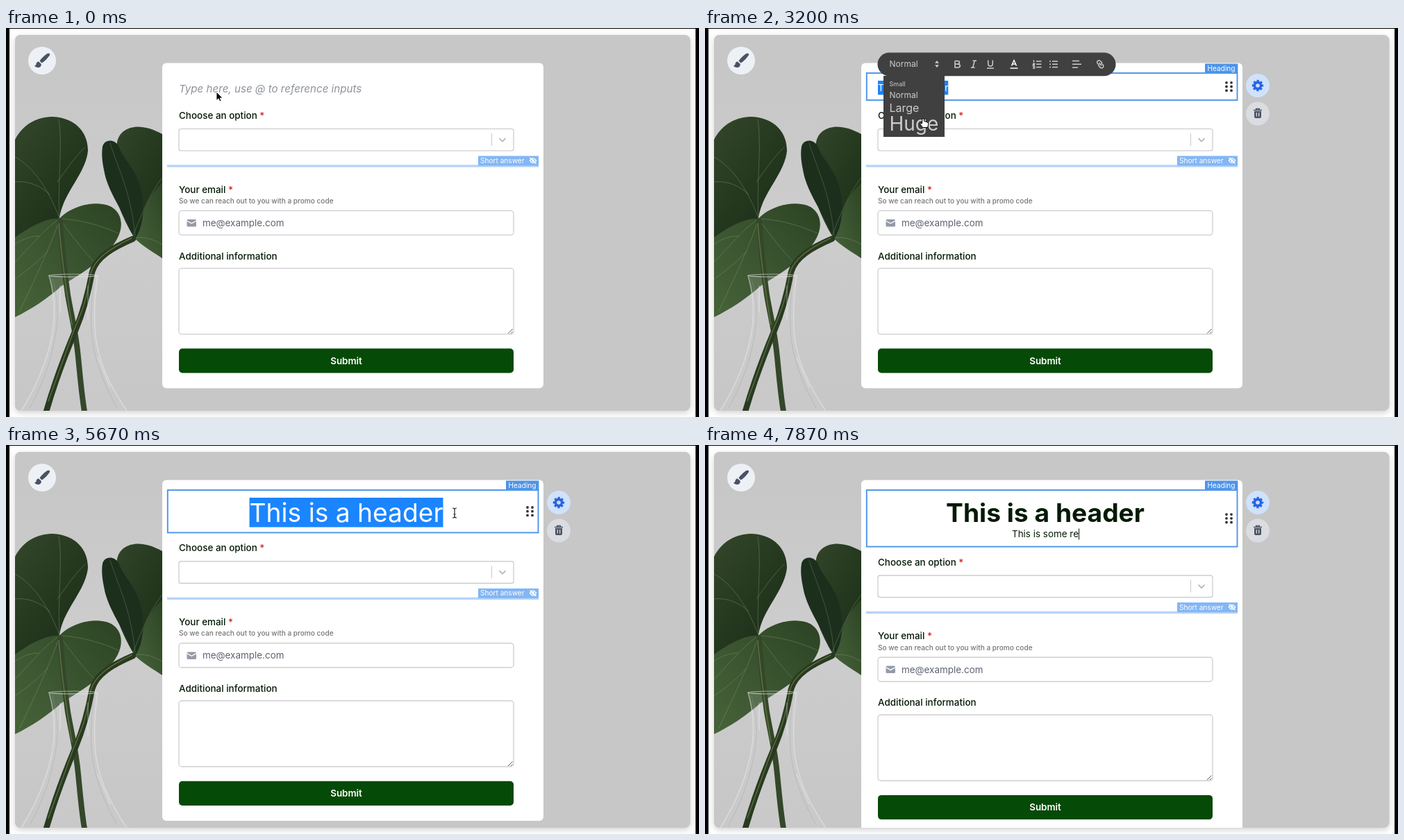
Recreate the animation shown at these times as an HTML page. Size 998 px wide and 561 px high, loop 8000 ms.

```html
<!DOCTYPE html>
<html lang="en">
<head>
<meta charset="utf-8">
<title>Form builder</title>
<style>
  html, body { margin: 0; width: 100%; height: 100%; overflow: hidden; background: #fff; }
  svg { display: block; width: 100%; height: 100%; }
  text { font-family: Inter, "Open Sans", sans-serif; font-size: 13.45px; font-optical-sizing: none; white-space: pre; }
  .label { font-weight: 500; fill: #041a04; }
  .star { fill: #d32020; }
  .tag { font-size: 10.15px; fill: #fff; }
  .field { fill: #fff; stroke: #c5c5c8; stroke-width: 1.1; }
  .icon { fill: none; stroke: currentColor; stroke-width: 1.5; color: #ccc; }
  .menu { fill: #404040; }
  .menu-text { fill: #ccc; }
</style>
</head>
<body>
<svg viewBox="0 0 998 561" xmlns="http://www.w3.org/2000/svg">
  <defs>
    <clipPath id="panelClip"><rect x="13" y="10" width="972.5" height="542" rx="8"/></clipPath>
    <linearGradient id="wall" x2="0" y2="1">
      <stop offset="0" stop-color="#c7c7c7"/><stop offset=".1" stop-color="#c7c7c7"/>
      <stop offset=".5" stop-color="#cdcdcd"/><stop offset=".95" stop-color="#c7c7c7"/>
    </linearGradient>
    <linearGradient id="leafDark" x2=".8" y2="1">
      <stop offset="0" stop-color="#34472b"/><stop offset=".5" stop-color="#263a20"/><stop offset="1" stop-color="#1b2c18"/>
    </linearGradient>
    <linearGradient id="leafLight" x1="1" x2="0" y2="1">
      <stop offset="0" stop-color="#2c4323"/><stop offset=".5" stop-color="#3a5430"/><stop offset="1" stop-color="#466339"/>
    </linearGradient>
  </defs>

  <rect width="998" height="561" fill="#fff"/>
  <path d="M0 0H998V1H0ZM0 0H5V561H0ZM993 0H998V561H993Z"/>
  <rect x="13" y="10" width="972.5" height="542" rx="8" fill="#c7c7c7" style="filter:drop-shadow(0 3px 4px rgba(0,0,0,.18))"/>

  <g clip-path="url(#panelClip)">
    <rect x="13" y="10" width="214" height="542" fill="url(#wall)"/>

    <g id="plant" fill="none" stroke-linecap="round">
      <path d="M160 165C164 142 192 134 225 153V332C205 318 193 310 185 303C166 272 155 240 147 205Z" fill="url(#leafDark)"/>
      <path d="M185 303C196 280 196 250 226 222V332C212 324 195 313 185 303Z" fill="url(#leafLight)"/>
      <path d="M139 171C142 160 156 160 162 170C170 192 190 205 196 240C200 270 195 290 186 304C172 270 152 245 143 214C139 196 137 184 139 171Z" fill="#1c2f1d"/>
      <path d="M150 166C160 200 180 235 186 300" stroke="#55704b" opacity=".6"/>
      <path d="M13 161C25 138 45 128 68 128C100 130 118 150 118 177C115 210 82 238 77 274C68 284 40 282 13 304Z" fill="url(#leafDark)"/>
      <path d="M13 302C35 286 60 273 77 275C92 258 128 246 152 258C174 272 168 302 146 322C130 342 105 356 80 372C60 390 36 406 13 417Z" fill="url(#leafLight)"/>
      <g stroke="#86a06c" opacity=".4">
        <path d="M77 274C62 235 40 200 13 186M77 274C74 220 82 170 76 132M77 275C55 290 35 315 13 338M77 276C66 310 45 355 20 408M78 275C105 276 135 284 162 296M78 276C95 300 110 320 126 336M182 302C198 260 210 235 225 216M184 303C200 300 212 305 225 312M74 222C90 200 100 185 114 172M63 240C48 226 30 220 13 222M48 300C36 300 24 304 13 312M60 322C45 338 30 350 13 362"/>
      </g>
      <path d="M62 357C70 385 72 415 66 445C58 485 42 520 22 552H174C152 520 134 485 129 445C126 415 128 385 132 357Z" fill="#d4d4d4" opacity=".18"/>
      <path d="M78 278C80 310 84 350 89 385C95 420 101 440 104 475C107 505 109 530 113 553" stroke="#35472a" stroke-width="8"/>
      <path d="M183 304C155 316 130 330 124 352C118 385 111 410 100 436C84 474 69 515 58 553" stroke="#293a20" stroke-width="8.500"/>
      <path d="M76 282C80 330 86 375 95 428M181 303C150 318 128 332 122 354C116 395 108 412 97 438L61 538" stroke="#74894f" stroke-width="1.600" opacity=".6"/>
      <path d="M62 357C70 385 72 415 66 445C58 485 42 520 22 552M132 357C128 385 126 415 129 445C134 485 152 520 174 552" stroke="#ececec" stroke-width="1.600" opacity=".5"/>
      <path d="M67 362C75 390 76 415 71 445C64 485 50 520 34 548M127 362C123 390 121 420 124 448C129 486 144 520 160 548" stroke="#999" opacity=".35"/>
      <ellipse cx="97" cy="357" rx="35" ry="2" stroke="#e6e6e6" stroke-width="1.200" opacity=".6"/>
      <path d="M118 372V420M78 372V410M132 475L150 518" stroke="#fff" stroke-width="1.500" opacity=".3"/>
    </g>

    <circle cx="52" cy="47" r="20" fill="#edf1f6"/>
    <path d="M63 37.500C62 36 60 36.500 58.500 37.500C54 41 50 44.500 48.500 47.500L51.500 50.500C55 49 59.500 44 62 40.500C63 39 63.500 38.300 63 37.500ZM47 48.500C44.500 48.500 43.700 50.500 43.500 52C43.300 53.600 42.300 54.200 41 54.200C42 56 44 57 46.200 57C49 57 51 55 50.800 52Z" fill="#4a5263"/>

    <rect id="card" x="225" y="50.500" width="549" rx="6" fill="#fff"/>

    <g id="form">
      <text class="label" x="249" y="131">Choose an option <tspan class="star">*</tspan></text>
      <rect class="field" x="249" y="145.500" width="482" height="31.500" rx="3"/>
      <path d="M699.500 152V170" stroke="#c8c8c8"/>
      <path d="M710.500 159L715 163.500L719.500 159" fill="none" stroke="#b4b4b4" stroke-width="1.700"/>

      <rect x="232" y="197.300" width="535" height="3.400" fill="#b6d4f8"/>
      <rect x="680" y="184.500" width="87" height="14" fill="#83b6f4"/>
      <text class="tag" x="683" y="195">Short answer</text>
      <g fill="none" stroke="#fff" stroke-width="1.400">
        <path d="M754.500 191.300Q759 184.500 763.500 191.300Q759 198 754.500 191.300ZM754.500 187L763.500 195.500"/>
        <circle cx="759" cy="191.300" r="1.200"/>
      </g>

      <text class="label" x="249" y="237.500">Your email <tspan class="star">*</tspan></text>
      <text x="249" y="253" fill="#747474" style="font-size:10.08px;font-weight:500">So we can reach out to you with a promo code</text>
      <rect class="field" x="249" y="263.500" width="482" height="35" rx="4"/>
      <rect x="260.500" y="276" width="13.500" height="10.500" rx="1.600" fill="#959ba7"/>
      <path d="M260.500 278.200L267.200 281.800L274 278.200" fill="none" stroke="#fff" stroke-width="1.300"/>
      <text x="283" y="286" fill="#5c6371">me@example.com</text>

      <text class="label" x="249" y="333.500">Additional information</text>
      <rect class="field" x="249" y="346.500" width="482" height="95" rx="4"/>
      <path d="M723 440.500L729.500 434M727 440.500L729.500 438" stroke="#555"/>
      <rect x="249" y="462.300" width="482" height="35.200" rx="5" fill="#064a07"/>
      <text x="490" y="484.700" text-anchor="middle" fill="#fff" font-weight="600">Submit</text>
    </g>

    <g id="chrome">
      <rect id="frame" x="232.800" y="65" width="533.700" fill="none" stroke="#4d94e8" stroke-width="1.900"/>
      <rect x="720" y="51.500" width="47.400" height="13.500" fill="#4d94e8"/>
      <text class="tag" x="743.500" y="61.700" text-anchor="middle">Heading</text>
      <g id="dots" fill="#333"></g>
      <circle cx="796" cy="83" r="17" fill="#d0e1fa"/>
      <g stroke="#2463e4" fill="none">
        <circle cx="796" cy="83" r="4.600" stroke-width="3.600"/>
        <circle cx="796" cy="83" r="7.100" stroke-width="2.200" stroke-dasharray="3.200 2.376" stroke-dashoffset="1.600"/>
      </g>
      <circle cx="796" cy="123.500" r="17" fill="#dbdce1"/>
      <path d="M790 118.500H802M793.800 118V116.500H798.200V118" fill="none" stroke="#4b5362" stroke-width="1.700"/>
      <path d="M791 120H801V128Q801 130 799 130H793Q791 130 791 128Z" fill="#4b5362"/>
      <path d="M794.300 122V127.500M797.700 122V127.500" stroke="#dbdce1" stroke-width="1.300"/>
    </g>

    <text id="placeholder" x="249" y="93.300" fill="#8e929c" style="font-size:15.13px;font-style:italic">Type here, use @ to reference inputs</text>
    <rect id="selection" y="76" fill="#1a85ff"/>
    <text id="title"></text>
    <text id="note" x="490" y="133" text-anchor="middle" fill="#041a04"></text>
    <rect id="caret" width="1" fill="#111"/>
  </g>

  <g id="toolbar">
    <rect class="menu" x="248.500" y="35.500" width="343" height="33.700" rx="16.800"/>
    <path id="arrow" class="menu" d="M-6 68.500H6L0 74.500Z"/>
    <text id="size" class="menu-text" x="265.500" y="56" style="font-size:12px"></text>
    <path d="M331 50.800L334 47L337 50.800ZM331 53.200L334 57L337 53.200Z" fill="#ccc"/>
    <g id="icons"></g>
    <g id="sizeMenu">
      <rect class="menu" x="257" y="69" width="88" height="88"/>
      <g class="menu-text">
        <text x="265.500" y="84" style="font-size:9px">Small</text>
        <text x="265.500" y="101" style="font-size:12px">Normal</text>
        <text x="265.500" y="121" style="font-size:16px">Large</text>
        <text x="265.500" y="148" style="font-size:28px">Huge</text>
      </g>
    </g>
    <g id="alignMenu">
      <rect class="menu" x="523" y="69" width="25" height="86"/>
      <path class="icon" d="M529 76H542M529 80H538M529 84H541M529 96H542M531.500 100H539.500M530 104H541M529 116H542M533 120H542M530 124H542M529 136H542M529 140H542M529 144H542"/>
    </g>
  </g>

  <g id="cursor" stroke-linejoin="round">
    <path id="arrowCursor" d="M0 0V12.500L3 9.800L5 14L7 13L5.200 9H9Z" stroke="#fff" stroke-width=".9"/>
    <path id="handCursor" d="M-1 1Q0 -.6 1.200 1L2 5Q3.500 4 4.300 5.500Q6 5 6.500 6.500Q8 6.300 7.800 8.500L6.600 13.500H-.5L-4.200 8.300Q-3.800 6.300 -1.600 8Z" fill="#fff" stroke="#000"/>
    <g id="beamCursor" fill="none">
      <path d="M-3 -7Q0 -7 0 -5Q0 -7 3 -7M0 -5.500V5.500M-3 7Q0 7 0 5Q0 7 3 7M-1.500 2H1.500" stroke="#fff" stroke-width="2.800" opacity=".7"/>
      <path d="M-3 -7Q0 -7 0 -5Q0 -7 3 -7M0 -5.500V5.500M-3 7Q0 7 0 5Q0 7 3 7M-1.500 2H1.500" stroke="#222" stroke-width="1.200"/>
    </g>
  </g>
</svg>

<script>
const LOOP = 8000, TICK = 1000 / 15;
const TITLE = 'This is a header', NOTE = 'This is some re';
const LEFT = 249, CENTER = 490, INK = '#041a04';
const $ = id => document.getElementById(id);
const set = (id, attrs) => Object.entries(attrs).forEach(([k, v]) => $(id).setAttribute(k, v));
const show = (id, on) => { $(id).style.display = on ? '' : 'none'; };
const within = (t, ...spans) => spans.some(([a, b]) => t >= a && t < b);

// Toolbar buttons: centre x and outline
const buttons = [
  [363, 'M360 47.500H363.500Q366.500 47.500 366.500 49.800Q366.500 52 363.500 52H360M363.500 52Q367.300 52 367.300 54.500Q367.300 57 363.800 57H360V47.500'],
  [387, 'M385.500 47.300H391M383 57H388.500M388.300 47.300L385.700 57'],
  [411, 'M407.700 46.500V51.500Q407.700 55 411 55Q414.300 55 414.300 51.500V46.500M406 58H416'],
  [445, 'M441.500 54.500L445 46.500L448.500 54.500M442.800 52H447.200M439.500 58H450.500'],
  [478, 'M477 48H484.500M477 52.300H484.500M477 56.600H484.500M473.500 46.200V49.500M472 51.500H474.500L472.500 53.500H475M472 55.500H474.500V58H472'],
  [502, 'M500 48H508M500 52.300H508M500 56.600H508M496 48H498M496 52.300H498M496 56.600H498'],
  [535, 'M529 47.500H539M529 52.300H542M529 57H537'],
  [569, 'M568 54L565.800 51.800Q563.500 49 566 47.200Q568 46 569.800 48L572 50.200M570.500 50.500L572.800 52.800Q575 55.500 572.500 57.300Q570.500 58.500 568.700 56.500L566.500 54.300M567.500 50L571 54.500']
];
$('icons').innerHTML = buttons.map(([, d]) => `<path class="icon" d="${d}"/>`).join('');
$('dots').innerHTML = [-5.7, 0, 5.7].flatMap(y => [751, 758].map(x => `<circle cx="${x}" cy="${84.5 + y}" r="1.9"/>`)).join('');

// Pointer path: time, x, y, shape
const path = [
  [0, 303, 92, 'arrow'], [120, 303, 92, 'arrow'], [130, 301.7, 92, 'arrow'], [600, 301.7, 92, ''],
  [2270, 574, 64, 'hand'], [2530, 413, 61, 'hand'], [2800, 300, 50, 'hand'], [2870, 301, 54, 'hand'],
  [3070, 310, 118, 'hand'], [3200, 314, 130, 'hand'], [3400, 314, 130, 'beam'], [3800, 555, 82, 'beam'], [3870, 555, 82, ''],
  [4330, 558, 72, 'hand'], [4600, 536, 50, 'hand'], [4870, 536, 54, 'hand'], [5130, 536, 97, 'hand'],
  [5270, 536, 97, 'beam'], [5670, 646, 98, 'beam'], [5800, 646, 98, '']
];

function pointerAt(t) {
  const i = path.findLastIndex(p => p[0] <= t);
  const a = path[i], b = path[i + 1] || a;
  const u = b === a ? 0 : (t - a[0]) / (b[0] - a[0]);
  const ease = u * u * (3 - 2 * u);
  return { x: a[1] + (b[1] - a[1]) * ease, y: a[2] + (b[2] - a[2]) * ease, shape: a[3] };
}

function typedTitle(t) {
  if (t < 800) return '';
  if (t >= 1800) return TITLE;
  if (t >= 1670) return TITLE.slice(0, 15);
  return TITLE.slice(0, Math.min(13, 1 + Math.round((t - 800) / 730 * 12)));
}

function drawText(t) {
  const huge = t >= 3400, bold = t >= 6400, centered = t >= 5270;
  const selected = within(t, [2000, 3870], [4130, 5800], [6070, 6670]);
  const title = $('title');
  title.textContent = typedTitle(t);
  title.style.fontSize = (huge ? 37.2 : 13.5) + 'px';
  title.style.fontWeight = bold ? 700 : 400;
  set('title', { x: centered ? CENTER : LEFT, y: huge ? 110.6 : 91,
    'text-anchor': centered ? 'middle' : 'start', fill: selected ? '#fff' : INK });
  const width = title.getComputedTextLength();
  show('selection', selected);
  set('selection', { x: centered ? CENTER - width / 2 : LEFT, width, height: huge ? 42.5 : 20.3 });

  const note = $('note');
  note.textContent = t < 7130 ? '' : NOTE.slice(0, 1 + Math.round((t - 7130) / 740 * 14));
  const onNote = t >= 6870;
  show('caret', within(t, [800, 2000]) || onNote);
  set('caret', onNote
    ? { x: CENTER + note.getComputedTextLength() / 2, y: 120.5, height: 16 }
    : { x: LEFT + width, y: 77.5, height: 16.5 });
}

function drawToolbar(t, pointer) {
  const open = within(t, [2070, 3400], [4130, 5270], [6070, 6600]);
  const huge = t >= 3400, centered = t >= 5270;
  show('toolbar', open);
  set('toolbar', { transform: `translate(${centered ? 70 : 0} ${huge ? -2.5 : 0})` });
  set('arrow', { transform: `translate(${centered ? 420 : huge ? 389 : 299} 0)` });
  $('size').textContent = huge ? 'Huge' : 'Normal';
  show('sizeMenu', within(t, [2870, 3400]));
  show('alignMenu', within(t, [4670, 5270]));
  [...$('icons').children].forEach((icon, i) => {
    const hovered = pointer.shape === 'hand' && pointer.y < 68 && Math.abs(pointer.x - buttons[i][0]) < 11;
    icon.style.color = hovered || (i === 0 && t >= 6400) || i === 3 ? '#fff' : '#ccc';
  });
}

function render(ms) {
  const t = Math.round(Math.floor((ms % LOOP + 4) / TICK) * TICK / 10) * 10 % LOOP;
  const shift = t >= 6870 ? 42.6 : t >= 3400 ? 22.4 : 0;
  const pointer = pointerAt(t);

  set('card', { height: 469 + shift });
  set('form', { transform: `translate(0 ${shift})` });
  set('frame', { height: 39 + shift });
  set('dots', { transform: `translate(0 ${shift / 2})` });
  show('chrome', t >= 330);
  $('chrome').style.opacity = Math.min(1, (t - 260) / 270);
  show('placeholder', t < 800);

  drawText(t);
  drawToolbar(t, pointer);
  ['arrow', 'hand', 'beam'].forEach(s => show(s + 'Cursor', s === pointer.shape));
  set('cursor', { transform: `translate(${pointer.x} ${pointer.y})` });
}

const start = performance.now();
function loop() {
  render(performance.now() - start);
  requestAnimationFrame(loop);
}
loop();
</script>
</body>
</html>
```
